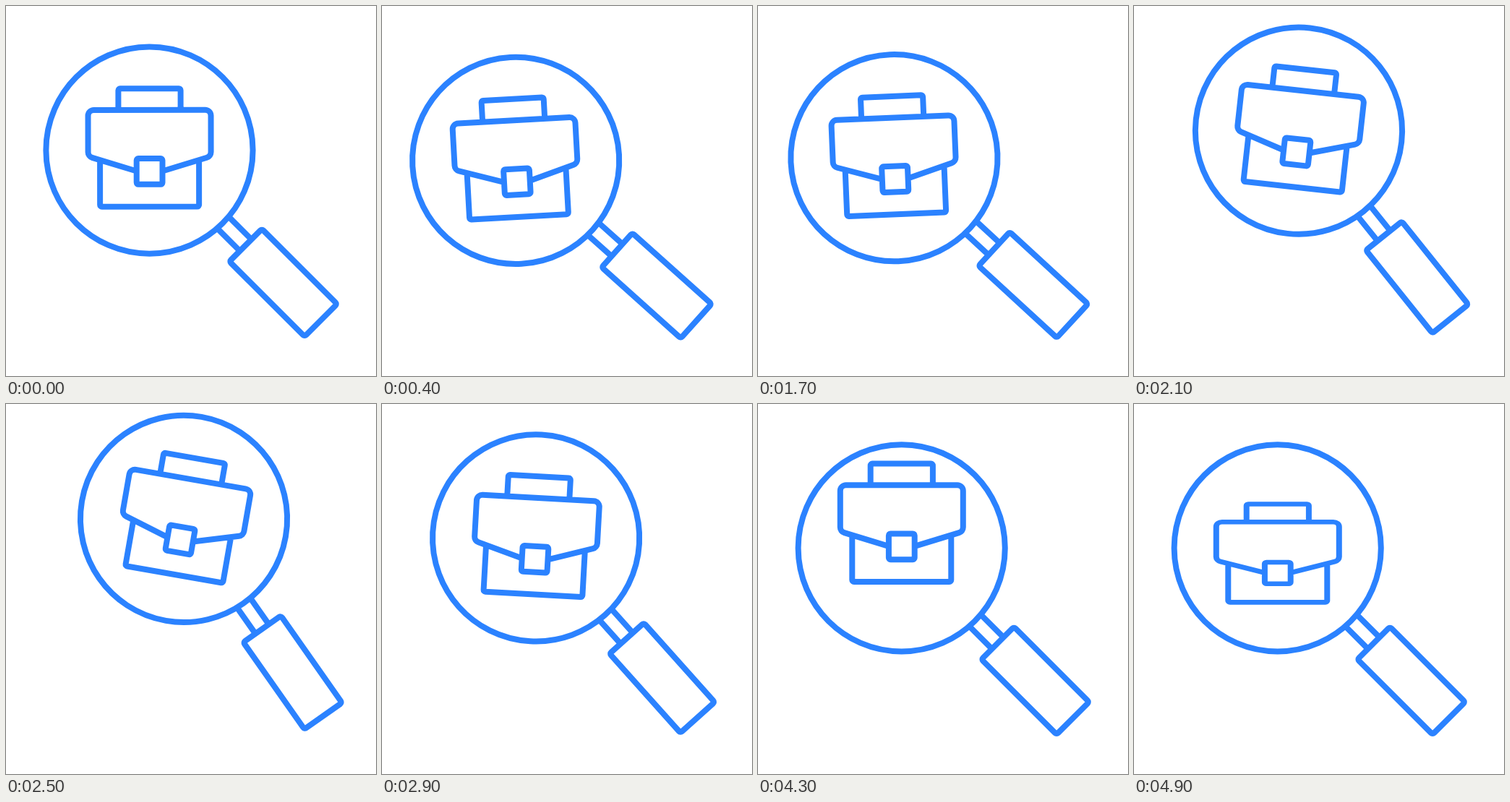
Animation, 512 px wide and 512 px high, one loop 5000 ms. Source, as an HTML page with a canvas:

```html
<!DOCTYPE html>
<html lang="en">
<head>
<meta charset="utf-8">
<title>Job search</title>
<style>
  html, body { margin: 0; width: 100%; height: 100%; overflow: hidden; background: #fff; }
  canvas { display: block; width: 100vw; height: 100vh; }
</style>
</head>
<body>
<canvas id="stage" width="512" height="512"></canvas>
<script>
const ctx = document.getElementById('stage').getContext('2d');
const LOOP = 5000, STEP = 100;
const SIZE = 512, LINE = 8, BLUE = '#2b82ff';
const PIVOT = { x: 455.5, y: 452 };
const LENS = { x: 198.7, y: 199.3, r: 143.1 };
const BAG = { x: 198.8, base: 281.4 };

// Smooth 0 to 1 between two times
function ramp(t, from, to) {
  const u = Math.min(1, Math.max(0, (t - from) / (to - from)));
  return u * u * (3 - 2 * u);
}

// Swing left, right and back; then the bag hops and squashes on landing
const tilt = t => 10 * (2 * ramp(t, 1150, 2460) - ramp(t, -50, 1150) - ramp(t, 2460, 3165));
const lift = t => 32 * (ramp(t, 3165, 4230) - ramp(t, 4230, 5080));
const squash = t => 1 - 0.24 * ramp(t, 4600, 5070);

// Path through half an outline and its mirror image, corners rounded by r
function mirrored(half, r) {
  const points = [...half, ...half.map(([x, y]) => [-x, y]).reverse()];
  points.forEach(([x, y], i) => {
    const next = points[i + 1];
    if (i === 0) ctx.moveTo(x, y);
    else if (next) ctx.arcTo(x, y, ...next, r);
    else ctx.lineTo(x, y);
  });
}

// Three-sided frame, open at one end
const frame = (w, open, end) => mirrored([[-w, open], [-w, end]], 2.5);

function drawGlass() {
  const side = -1, neck = 11.3, grip = 187.1;
  ctx.save();
  ctx.translate(LENS.x, LENS.y);
  ctx.rotate(Math.PI / 4);
  ctx.beginPath();
  ctx.arc(0, 0, LENS.r, 0, Math.PI * 2);
  for (const y of [side - neck, side + neck]) {
    ctx.moveTo(LENS.r, y);
    ctx.lineTo(grip, y);
  }
  ctx.roundRect(grip, side - 31.8, 147, 63.6, 3);
  ctx.stroke();
  ctx.restore();
}

function drawBag(t) {
  const clasp = 17.9, flap = 85, top = -137.7, fold = -53.1, slope = 0.305;
  const flapEdge = x => fold - slope * (x - clasp);
  ctx.save();
  ctx.translate(BAG.x, BAG.base - lift(t));
  ctx.scale(1, squash(t));
  ctx.beginPath();
  frame(43.1, top, -167.4);
  frame(68.5, flapEdge(68.5), -LINE / 2);
  mirrored([[-clasp, fold], [-flap, flapEdge(flap)], [-flap, top]], 8);
  ctx.roundRect(-clasp, -70.6, 2 * clasp, 2 * clasp, 2.5);
  ctx.stroke();
  ctx.restore();
}

function draw(t) {
  ctx.fillStyle = '#fff';
  ctx.fillRect(0, 0, SIZE, SIZE);
  ctx.strokeStyle = BLUE;
  ctx.lineWidth = LINE;
  ctx.save();
  ctx.translate(PIVOT.x, PIVOT.y);
  ctx.rotate(tilt(t) * Math.PI / 180);
  ctx.translate(-PIVOT.x, -PIVOT.y);
  drawGlass();
  drawBag(t);
  ctx.restore();
}

const start = performance.now();

function tick() {
  const t = (performance.now() - start) % LOOP;
  draw(Math.floor(t / STEP) * STEP);
  requestAnimationFrame(tick);
}
tick();
</script>
</body>
</html>
```
